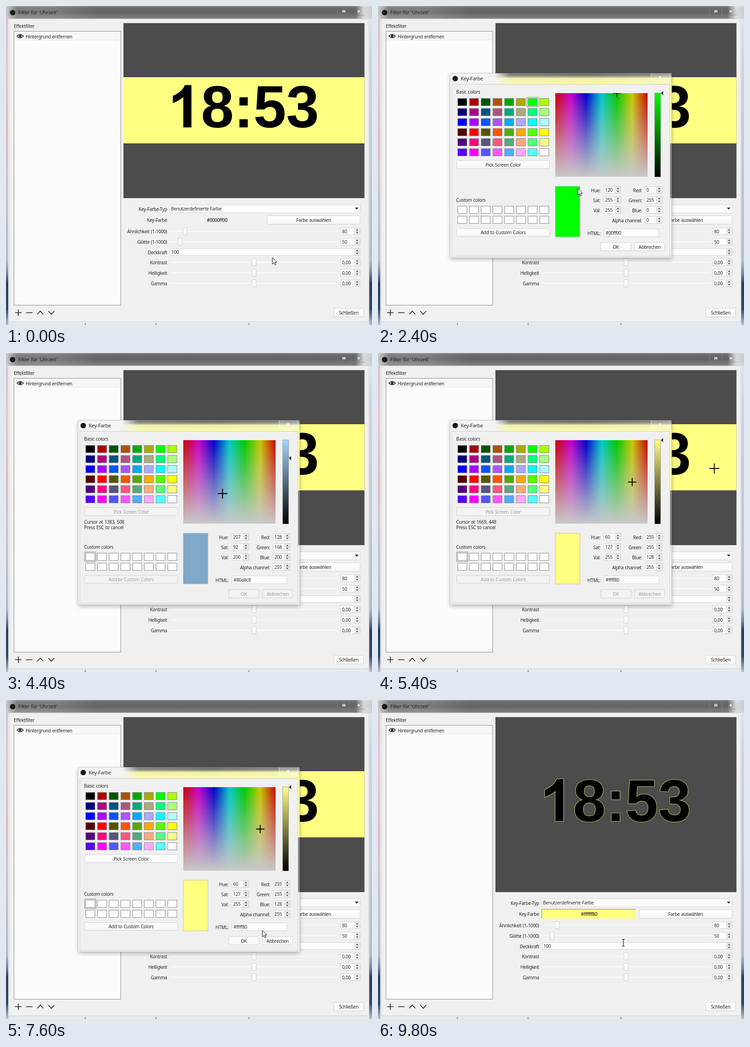
Animation, 801 px wide and 699 px high, one loop 9830 ms. Source, as an HTML page:

```html
<!DOCTYPE html>
<html lang="de">
<head>
<meta charset="utf-8">
<title>Key-Farbe</title>
<style>
html, body { margin: 0; width: 100%; height: 100%; overflow: hidden; background: #f0f0f0; }
svg { position: absolute; left: 0; top: 0; width: 801px; height: 699px; }
text { font: 10px "Noto Sans", "Open Sans", sans-serif; letter-spacing: -.3px; word-spacing: .7px; fill: #262626; }
.title { font-size: 11px; }
.clock { font: bold 129px "Liberation Sans", Arial, sans-serif; letter-spacing: 0; fill: #000; }
.btn { fill: url(#btnFill); stroke: #d2d2d2; }
.box { fill: #fdfdfd; stroke: #d6d6d6; }
.off text { fill: #9c9c9c; }
.off .btn { fill: #f3f3f3; }
#dialog { transform-origin: 400px 350px; }
</style>
</head>
<body>
<svg id="main" viewBox="0 0 801 699"></svg>
<svg id="dialog" viewBox="0 0 801 699"></svg>
<svg id="pointer" viewBox="0 0 801 699">
  <path id="arrow" d="M0 0V14.5L3.4 11.4L5.8 16.6L8 15.6L5.7 10.5H10Z" fill="#fff" stroke="#111"/>
  <path id="cross" d="M-11 0H11M0 -11V11" stroke="#000" stroke-width="1.8"/>
  <path id="beam" d="M-3 -7.5H-1L0 -6.5L1 -7.5H3M0 -6.5V6.5M-3 7.5H-1L0 6.5L1 7.5H3" fill="none" stroke="#111" stroke-width="1.2"/>
</svg>
<script>
const LOOP = 9830, STEP = 100;
const $ = id => document.getElementById(id);

// ---- drawing helpers ----
const rect = (x, y, w, h, attr = '') => `<rect x="${x}" y="${y}" width="${w}" height="${h}" ${attr}/>`;
const path = (d, attr) => `<path d="${d}" ${attr}/>`;
// y is the middle of the capital letters
const text = (x, y, s, anchor = 'start', attr = '') =>
  `<text x="${x}" y="${y + 3.5}" text-anchor="${anchor}" ${attr}>${s}</text>`;
const button = (x, y, w, h, s) =>
  rect(x + .5, y + .5, w - 1, h - 1, 'rx="1.5" class="btn"') + text(x + w / 2, y + h / 2 + .5, s, 'middle');
const stop = (o, c, a = 1) => `<stop offset="${o}" stop-color="${c}" stop-opacity="${a}"/>`;
const grad = (id, stops, across) =>
  `<linearGradient id="${id}" x2="${across ? 1 : 0}" y2="${across ? 0 : 1}">${stops}</linearGradient>`;

function spin(x, y, w, s, id = '') {
  const ax = x + w - 7;
  return rect(x + .5, y - 7.5, w - 1, 15, 'class="box"') +
    rect(ax - 6, y - 6.5, 12, 6.5, 'fill="#f1f1f1" stroke="#cfcfd2" stroke-width=".8"') +
    rect(ax - 6, y, 12, 6.5, 'fill="#f1f1f1" stroke="#cfcfd2" stroke-width=".8"') +
    path(`M${ax - 3} ${y - 1.8}h6l-3 -3.2zM${ax - 3} ${y + 1.8}h6l-3 3.2z`, 'fill="#55586a"') +
    text(x + 3, y + .5, s, 'start', id && `id="${id}"`);
}

function slider(y, knob, label, value) {
  return text(352.5, y, label, 'end') +
    rect(359, y - 2, 369, 3, 'rx="1" fill="#fbfbfb" stroke="#e6e6e6" stroke-width=".6"') +
    rect(knob - 4.5, y - 8.5, 9, 16, 'rx="1.5" fill="url(#btnFill)" stroke="#d0d0d0"') +
    spin(732.5, y - .5, 43, value);
}

const logo = (x, y) => `<circle cx="${x}" cy="${y}" r="6" fill="#1c1a1c"/>`;
const closeMark = (x, y) => path(`M${x - 2} ${y - 2}l4 4m0 -4l-4 4`, 'stroke="#fff" stroke-width="1.6"');

// ---- filter window ----
function clock() {
  // the "1" has no foot, unlike the one in the font
  const one = 'M806 0H525V1059Q371 915 162 846V1101Q272 1137 401 1237T578 1472H806Z';
  return '<g id="clock" paint-order="stroke">' +
    path(one, 'transform="translate(355 266) scale(.063 -.063)" stroke-width="32"') +
    '<text class="clock" x="426.7" y="266" stroke-width="2">8:53</text></g>';
}

function mainWindow() {
  const night = stop(.84, '#6f84a2') + stop(.87, '#243f60') + stop(.95, '#2c4a6c') + stop(1, '#b9c3ce');
  const west = stop(0, '#cfc6cc') + stop(.2, '#e2ccd2') + stop(.42, '#dcbcc2') + stop(.52, '#cfc6d2') +
    stop(.8, '#b4bccd') + night;
  const east = stop(0, '#e6ebf4') + stop(.15, '#cdd5e6') + stop(.5, '#c3c8dc') + stop(.8, '#b0bdd4') + night;
  const bar = stop(0, '#8f8f8f') + stop(.12, '#6a6a6a') + stop(.5, '#646464') + stop(1, '#808080');
  const shine = stop(0, '#fff', .65) + stop(.03, '#fff', .15) + stop(.13, '#fff', .15) + stop(.25, '#fff', 0) +
    stop(.955, '#fff', 0) + stop(.978, '#fff', .75) + stop(1, '#dde6f2', .8);
  const marks = [172, 327, 530].map(x => rect(x, 695, 3, 4, 'fill="#a4a9b2"')).join('');
  const frame = rect(0, 0, 400, 699, 'fill="url(#west)"') + rect(400, 0, 401, 699, 'fill="url(#east)"') +
    rect(5, 27, 790, 667, 'fill="#fafafa"') +
    rect(0, 0, 801, 28, 'fill="url(#bar)"') + rect(0, 0, 801, 28, 'fill="url(#shine)"') +
    rect(5, 692, 790, 7, 'fill="#e6e9ed"') + marks +
    rect(7, 28, 787, 664, 'fill="#f0f0f0" stroke="#c4c4c8" stroke-width=".8"') +
    logo(14.5, 14.5) + text(27, 14.5, "Filter für 'Uhrzeit'", 'start', 'class="title"') +
    path('M725.5 0V18Q725.5 20 728 20H785M752.5 0V20', 'fill="none" stroke="#858585" stroke-width=".8"') +
    path('M737.5 8.5V14.5M741.5 8.5V14.5M738 11.5H741', 'stroke="#fff" stroke-width="1.7"') + closeMark(772, 11.5);
  const list = text(17, 44, 'Effektfilter') +
    rect(17.5, 55.5, 233.5, 600, 'fill="#fcfcfc" stroke="#85888d"') +
    rect(19, 57.5, 231, 17, 'fill="#f7f7f7"') + rect(19, 74, 231, 1, 'fill="#e6e6e6"') +
    path('M24 66Q31 58.5 38 66Q31 73.5 24 66Z', 'fill="none" stroke="#2a2a2a" stroke-width="1.5"') +
    '<circle cx="31" cy="66" r="2.8" fill="#2a2a2a"/>' + text(43, 67, 'Hintergrund entfernen') +
    path('M20 672H34M27 665V679M44 672H58M68.5 675.5L75 668.5L81.5 675.5M92.5 668.5L99 675.5L105.5 668.5',
      'fill="none" stroke="#222" stroke-width="1.6"');
  const preview = rect(257, 37.5, 527.5, 383.5, 'fill="#4c4c4c"') +
    rect(257, 156, 527.5, 145, 'id="band" fill="#ffff82"') + clock();
  const form = text(352.5, 445, 'Key-Farbe-Typ', 'end') +
    rect(359.5, 435.5, 416, 17.5, 'class="box"') + text(361, 444.5, 'Benutzerdefinierte Farbe') +
    path('M763.5 441.8h8l-4 4.4z', 'fill="#222"') +
    text(352.5, 469.5, 'Key-Farbe', 'end') +
    `<g id="swatch">${rect(359, 459, 205, 20, 'fill="#ffff80"')}${path('M358.5 479V458.5H564', 'fill="none" stroke="#8c8c70"')}</g>` +
    text(462, 469.5, '', 'middle', 'id="keyText" style="fill:#000"') +
    button(571, 459, 204.5, 20, 'Farbe auswählen') +
    slider(494, 392, 'Ähnlichkeit (1-1000)', '80') + slider(517, 381, 'Glätte (1-1000)', '50') +
    text(352.5, 540, 'Deckkraft', 'end') + spin(359, 539, 416.5, '100') +
    slider(562, 543, 'Kontrast', '0,00') + slider(585, 543, 'Helligkeit', '0,00') + slider(608, 543, 'Gamma', '0,00') +
    button(717, 662, 66, 20, 'Schließen');
  return `<defs>${grad('btnFill', stop(0, '#ffffff') + stop(1, '#f6f6f6'))}${grad('west', west)}${grad('east', east)}` +
    `${grad('bar', bar)}${grad('shine', shine, true)}</defs>` + frame + list + preview + form;
}

// ---- colour dialog ----
const FIELD = { x: 388, y: 191, w: 202, h: 183 };
const colX = i => 174.5 + 25.63 * i;
const rowY = i => 202.5 + 22 * i;

function wells() {
  let s = '';
  for (let i = 0; i < 48; i++) {
    const row = i >> 3, col = i & 7;
    const r = (col & 1 ? 170 : 0) + (row > 2 ? 85 : 0), g = (col >> 1) * 85, b = [0, 127, 255][row % 3];
    s += rect(colX(col), rowY(row), 20, 16, `fill="rgb(${r},${g},${b})" stroke="#858585"`);
  }
  for (let i = 0; i < 16; i++)
    s += rect(colX(i & 7), 438.5 + 22 * (i >> 3), 20, 16, 'fill="#fdfdfd" stroke="#8a8a8a"');
  return s;
}

function colorDialog() {
  const hues = ['#c80000', '#c800c8', '#0000c8', '#00c8c8', '#00c800', '#c8c800', '#c80000'];
  const defs = grad('hue', hues.map((c, i) => stop(i / 6, c)).join(''), true) +
    grad('pale', stop(0, '#c8c8c8', 0) + stop(1, '#c8c8c8')) +
    grad('glass', stop(0, '#565656') + stop(.25, '#777768') + stop(.45, '#eded9f') + stop(1, '#ffff9e')) +
    grad('glow', stop(0, '#f4f4f2') + stop(.2, '#f4f4f2') + stop(.27, '#f4f4f2', .2) + stop(.6, '#fff', .08) + stop(1, '#fff', .25), true) +
    grad('value', '<stop id="valueTop" offset="0"/>' + stop(1, '#000')) +
    '<filter id="soft" x="-10%" y="-10%" width="120%" height="120%"><feGaussianBlur stdDeviation="5"/></filter>' +
    `<clipPath id="fieldClip">${rect(FIELD.x, FIELD.y, FIELD.w, FIELD.h)}</clipPath>`;
  const frame = rect(158, 151, 485, 404, 'fill="#000" opacity=".28" filter="url(#soft)"') +
    rect(157, 147, 486, 405, 'rx="3" fill="#f4f4f4"') +
    rect(254, 147, 389, 25, 'fill="url(#glass)"') + rect(157, 147, 486, 25, 'rx="3" fill="url(#glow)"') +
    rect(639, 172, 4, 129, 'fill="#ffffa4"') + rect(639, 301, 4, 120, 'fill="#828282"') +
    rect(157.5, 147.5, 485, 404, 'rx="3" fill="none" stroke="#9b9b9b" stroke-opacity=".5"') +
    rect(161.5, 171.5, 477.5, 377, 'fill="#f0f0f0" stroke="#c2c2bc" stroke-width=".8"') +
    logo(169, 159) + text(181, 159, 'Key-Farbe', 'start', 'class="title"') +
    path('M597.5 148V164H639V148', 'fill="#fff" fill-opacity=".2" stroke="#fff" stroke-opacity=".7"') + closeMark(617.5, 156);
  const left = text(171, 188.5, 'Basic colors') + wells() +
    '<rect id="focus" width="25" height="21" fill="none" stroke="#111" stroke-dasharray="1 1"/>' +
    `<g id="pick">${button(172, 338, 204, 19, 'Pick Screen Color')}</g>` +
    `<g id="hint">${text(171, 370, '', 'start', 'id="where"')}${text(171, 382, 'Press ESC to cancel')}</g>` +
    text(171, 425, 'Custom colors') + `<g id="add">${button(172, 487, 204, 18, 'Add to Custom Colors')}</g>`;
  const area = fill => rect(FIELD.x, FIELD.y, FIELD.w, FIELD.h, `fill="${fill}"`);
  const right = area('url(#hue)') + area('url(#pale)') +
    `<g clip-path="url(#fieldClip)">${path('M-9 0H9M0 -9V9', 'id="mark" stroke="#000" stroke-width="2"')}</g>` +
    rect(605.5, 190.5, 13, 184, 'fill="url(#value)" stroke="#888" stroke-width=".7"') +
    path('M0 0L5 -4.5V4.5Z', 'id="valueMark" fill="#222"') +
    rect(388, 395, 54, 111, 'id="sample" stroke="#b5b5b5" stroke-width=".8"');
  const label = (x, y, s) => text(x, y, s, 'end');
  const fields = label(487, 404, 'Hue:') + label(487, 426, 'Sat:') + label(487, 448, 'Val:') +
    label(578, 404, 'Red:') + label(578, 426, 'Green:') + label(578, 448, 'Blue:') +
    label(578, 470, 'Alpha channel:') + label(487, 498, 'HTML:') +
    ['hueNum', 'satNum', 'valNum'].map((id, i) => spin(494, 403 + 22 * i, 38, '', id)).join('') +
    ['redNum', 'greenNum', 'blueNum', 'alphaNum'].map((id, i) => spin(584.5, 403 + 22 * i, 38, '', id)).join('') +
    rect(494.5, 488.5, 120, 17, 'class="box"') + text(498, 497.5, '', 'start', 'id="html"') +
    `<g id="ends">${button(487, 518, 67, 19, 'OK')}${button(561, 518, 67, 19, 'Abbrechen')}</g>`;
  return `<defs>${defs}</defs>` + frame + left + right + fields;
}

// ---- colour maths ----
function hsvToRgb(h, s, v) {
  const f = n => {
    const k = (n + h / 60) % 6;
    return Math.round(v * (1 - s * Math.max(0, Math.min(k, 4 - k, 1))));
  };
  return [f(5), f(3), f(1)];
}

function rgbToHsv([r, g, b]) {
  const v = Math.max(r, g, b), d = v - Math.min(r, g, b);
  if (!d) return [0, 0, v];
  const h = v === r ? ((g - b) / d + 6) % 6 : v === g ? (b - r) / d + 2 : (r - g) / d + 4;
  return [Math.round(h * 60), Math.round(255 * d / v), v];
}

// colour on screen below the picking cross
function colorAt(x, y) {
  if (x < 376 && y > 338) return [250, 250, 250];
  const fx = (x - FIELD.x) / FIELD.w, fy = (y - FIELD.y) / FIELD.h;
  if (fx >= 0 && fx < 1 && fy >= 0 && fy < 1) return hsvToRgb(360 * (1 - fx), 1 - fy, 200);
  if (x > 639 && y > 156 && y < 301) return [255, 255, 128];
  return [240, 240, 240];
}

// ---- motion ----
const OPEN = 1400, PICK = 3000, PICKED = 5600, OK = 8500, FADE = 300;
// time, x, y
const moves = [
  [0, 583, 551], [1100, 613, 473], [1800, 613, 473], [2900, 304, 344], [3800, 304, 344],
  [5200, 736, 253], [5600, 736, 253], [6500, 589, 477], [7100, 589, 477], [8100, 533, 532],
  [8800, 533, 532], [9300, 537, 532], [LOOP, 537, 532]
];

function pointerAt(t) {
  const i = moves.findIndex((m, n) => n && m[0] >= t);
  const [t0, x0, y0] = moves[i - 1], [t1, x1, y1] = moves[i];
  const p = (t - t0) / (t1 - t0), e = p * p * (3 - 2 * p);
  return [x0 + (x1 - x0) * e, y0 + (y1 - y0) * e];
}

const show = (id, on) => { $(id).style.display = on ? '' : 'none'; };
const put = (id, x, y) => $(id).setAttribute('transform', `translate(${x} ${y})`);
const say = (id, s) => { $(id).textContent = s; };

function drawColor(rgb, alpha) {
  const [h, s, v] = rgbToHsv(rgb);
  const hex = '#' + rgb.map(n => n.toString(16).padStart(2, '0')).join('');
  const top = `rgb(${hsvToRgb(h, s / 255, 255)})`;
  ['hue', 'sat', 'val'].forEach((n, i) => say(n + 'Num', [h, s, v][i]));
  ['red', 'green', 'blue'].forEach((n, i) => say(n + 'Num', rgb[i]));
  say('alphaNum', alpha);
  say('html', hex);
  $('sample').setAttribute('fill', hex);
  $('valueTop').setAttribute('stop-color', top);
  put('mark', FIELD.x + FIELD.w * (1 - h / 360), FIELD.y + FIELD.h * (1 - s / 255));
  put('valueMark', 619, FIELD.y + FIELD.h * (1 - v / 255));
}

function render(t) {
  const [x, y] = pointerAt(t);
  const picking = t >= PICK && t < PICKED, done = t > OK;
  put('arrow', x, y);
  put('cross', x, y);
  put('beam', x, y);
  show('cross', picking);
  show('beam', done);
  show('arrow', !picking && !done);

  show('band', !done);
  $('clock').setAttribute('stroke', done ? '#cccc5e' : 'none');
  show('swatch', done);
  say('keyText', done ? '#ffffff80' : '#0000ff00');

  const p = Math.max(0, Math.min(1, (t - OPEN) / FADE, 1 - (t - OK) / FADE));
  const dlg = $('dialog'), q = 3 * (1 - p);
  show('dialog', p > 0);
  dlg.style.opacity = p > .99 ? 1 : p * .92;
  dlg.style.transform = p < 1
    ? `translateY(${-3.5 * q}px) perspective(1550px) rotateX(${-6 * q}deg) scale(${1 - .055 * q}, ${1 - .049 * q})` : 'none';

  const rgb = t < PICK ? [0, 255, 0] : picking ? colorAt(x, y) : [255, 255, 128];
  drawColor(rgb, t < PICK ? 0 : 255);
  show('hint', picking);
  say('where', `Cursor at ${Math.round(1197 + (x - 304) / .9153)}, ${Math.round(547 + (y - 344) / .919)}`);
  for (const id of ['pick', 'add', 'ends']) $(id).setAttribute('class', picking ? 'off' : '');
  const focus = $('focus');
  focus.setAttribute('x', t < PICK ? colX(6) - 2.5 : 172);
  focus.setAttribute('y', t < PICK ? 200 : 436);
  show('focus', t < OK);
}

$('main').innerHTML = mainWindow();
$('dialog').innerHTML = colorDialog();
const start = performance.now();
function tick() {
  const t = (performance.now() - start) % LOOP;
  render(Math.floor(t / STEP) * STEP);
  requestAnimationFrame(tick);
}
tick();
</script>
</body>
</html>
```
